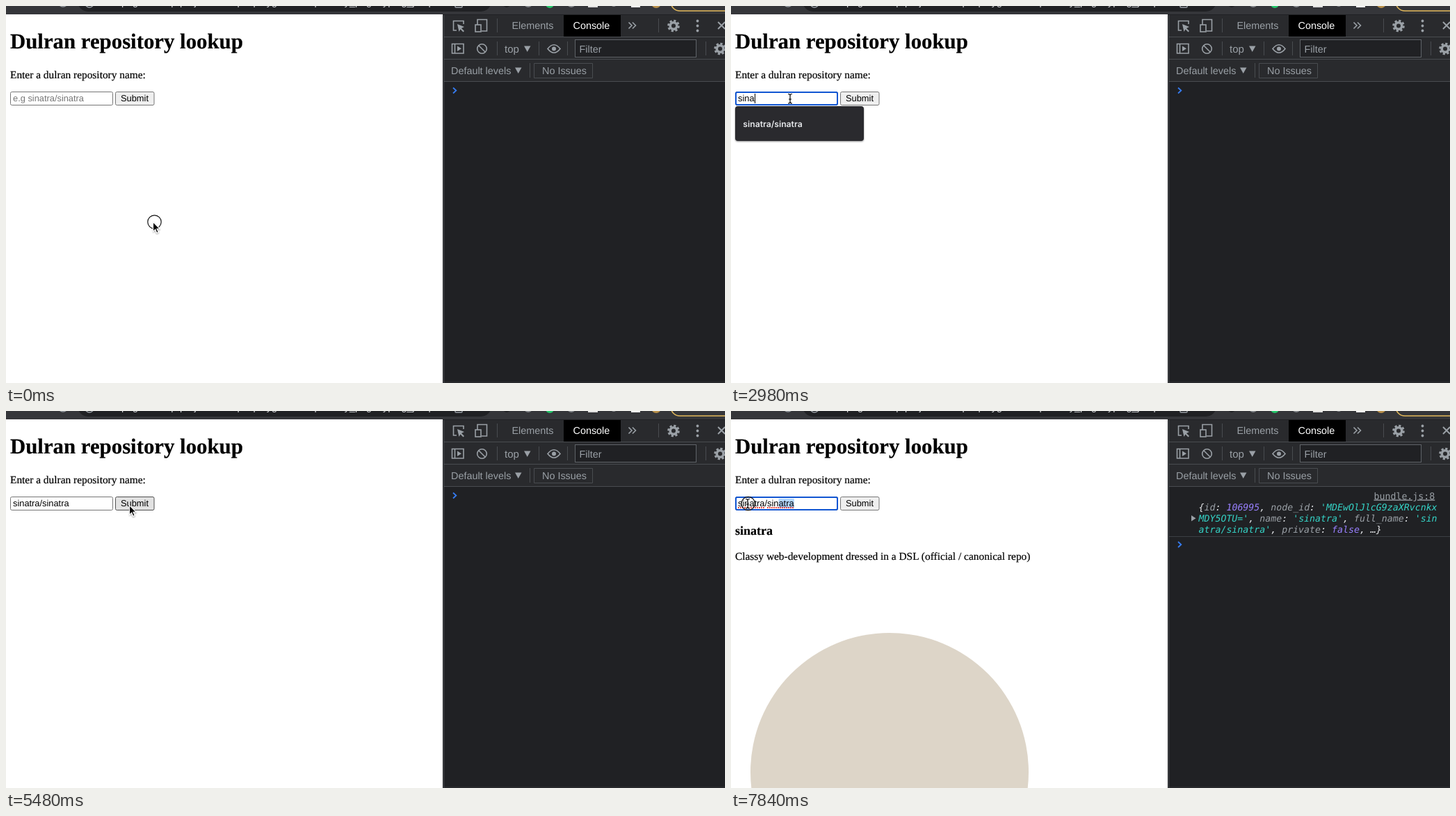
An HTML page for the animation above (7990 ms loop, 1034 by 542 pixels).

```html
<!DOCTYPE html>
<html lang="en">
<head>
<meta charset="utf-8">
<title>Repository lookup</title>
<style>
  html, body { margin: 0; width: 100%; height: 100%; overflow: hidden; background: #fff; }
  svg { display: block; width: 1034px; height: 542px; }
  text { white-space: pre; text-rendering: geometricPrecision; }
  .serif { font: 15.4px "Liberation Serif", Times, serif; stroke: #000; stroke-width: .2px; }
  .h1 { font-size: 30.8px; font-weight: bold; }
  .h3 { font-size: 18px; font-weight: bold; }
  .field { font: 12.83px "Liberation Sans", Arial, sans-serif; }
  .hint { font: 600 12.2px Inter, sans-serif; fill: #e8eaed; }
  .tools { font: 14.4px "Liberation Sans", Arial, sans-serif; fill: #9aa0a6; }
  .log { font: 13.25px "DejaVu Sans Mono", monospace; fill: #9aa0a6; }
  .log .obj { font-style: italic; }
  .log .w { fill: #e8eaed; }
  .log .s { fill: #35d4c7; }
  .log .n { fill: #9980ff; }
  .line { fill: none; stroke: #9aa0a6; stroke-width: 1.6; }
  .rule { fill: none; stroke: #494c50; }
</style>
</head>
<body>
<svg viewBox="0 0 1034 542">
  <defs>
    <filter id="shadow" x="-10%" y="-10%" width="120%" height="130%">
      <feDropShadow dx="0" dy="1" stdDeviation="1.3" flood-opacity=".45"/>
    </filter>
    <g id="gear" fill="none" stroke="#9aa0a6">
      <circle r="4.8" stroke-width="3.6"/>
      <circle r="7.4" stroke-width="2.8" stroke-dasharray="3.2 2.61"/>
    </g>
  </defs>
  <rect width="1034" height="542" fill="#fff"/>

  <!-- Page -->
  <g class="serif">
    <text class="h1" x="6" y="61">Dulran repository lookup</text>
    <text x="6" y="104">Enter a dulran repository name:</text>
  </g>
  <g id="result">
    <g class="serif">
      <text class="h3" x="6" y="178">sinatra</text>
      <text x="6" y="214">Classy web-development dressed in a DSL (official / canonical repo)</text>
    </g>
    <circle cx="228" cy="519" r="200" fill="#ddd5c8"/>
  </g>
  <rect x="6.5" y="123.5" width="147" height="19" rx="2" fill="#fff" stroke="#767676"/>
  <rect id="focus" x="7" y="124" width="146" height="18" rx="2" fill="#fff" stroke="#1055d2" stroke-width="2"/>
  <rect id="selection" x="68.5" y="126" width="22.3" height="14" fill="#b3d7ff"/>
  <text id="value" class="field" x="10" y="137"></text>
  <path id="squiggle" d="M10 139H48M52 139H90" stroke="#e5392f" stroke-width="1.8" stroke-dasharray="1.8 1.2"/>
  <path id="caret" d="M.5 126V140" stroke="#000"/>
  <rect id="button" x="157.5" y="123.5" width="55.5" height="19" rx="2"/>
  <text class="field" x="185" y="137" text-anchor="middle">Submit</text>
  <g id="menu">
    <rect x="6" y="144" width="185" height="50" rx="4" fill="#292a2d" filter="url(#shadow)"/>
    <text class="hint" x="17.3" y="174">sinatra/sinatra</text>
  </g>

  <!-- Browser bar -->
  <rect width="1034" height="12" fill="#35363a"/>
  <rect x="103" y="-22" width="595" height="30" rx="15" fill="#202124"/>
  <text class="tools" x="166" y="-1.5" style="fill:#d5d7da">page-lookup-project.example/playground/repository_page/typing_jump</text>
  <g fill="none" stroke="#9aa0a6" stroke-width="1.5">
    <circle cx="82" cy="-6" r="7"/><circle cx="120" cy="-4" r="6"/>
    <rect x="646" y="-8" width="10" height="10" rx="1"/>
    <rect x="956" y="-20" width="100" height="27" rx="13" stroke="#e3b95b"/>
  </g>
  <g fill="#85888c">
    <circle cx="720" cy="-3" r="5" fill="#202124"/><circle cx="751" cy="-4" r="6"/>
    <circle cx="782" cy="-3" r="6" fill="#24c76a"/><circle cx="813" cy="-4" r="6"/>
    <rect x="837" y="-8" width="14" height="10" fill="#ddd"/><circle cx="874" cy="-4" r="5"/>
    <rect x="899" y="-9" width="13" height="11" fill="#eee"/><circle cx="935" cy="-4" r="7" fill="#b9904a"/>
  </g>

  <!-- Developer tools -->
  <rect x="628" y="12" width="406" height="530" fill="#202124"/>
  <rect x="630" y="13" width="404" height="96" fill="#292a2d"/>
  <rect x="802" y="13" width="82" height="31" fill="#000"/>
  <rect x="818.5" y="48.5" width="174" height="25" fill="#202124" stroke="#5f6368"/>
  <path class="rule" d="M629.5 13V542M630 44.5H1034M630 76.5H1034M630 108.5H1034M706.5 18V38M938.5 18V38M706.5 51V71M766.5 51V71M807.5 51V71M1006.5 51V71M753.5 82V103M759.5 82.5H843.5V103.5H759.5Z"/>
  <path d="M630 541H1034" stroke="#292a2d" stroke-width="2"/>
  <g class="line">
    <path d="M648 35H643.5V21.5H658V26"/>
    <path d="M678 27V19.5H691.5V36H684"/><rect x="675" y="27" width="8" height="10"/>
    <path d="M895.5 23.5L900 28L895.5 32.5M901 23.5L905.5 28L901 32.5"/>
    <path d="M1024 23L1034 33M1034 23L1024 33" stroke-width="2"/>
    <path d="M641.5 54.5H658V68H641.5ZM645.5 54V68"/>
    <circle cx="684.5" cy="61.5" r="6.8"/><path d="M679.7 56.7L689.3 66.3"/>
    <path d="M779 61.5Q788 50 797 61.5Q788 73 779 61.5Z"/>
  </g>
  <g fill="#9aa0a6">
    <path d="M649 26L659 30L655 32L659 36L657.5 37.5L653.5 33.5L651.5 37Z"/>
    <path d="M649 57.5V65L655 61.2Z"/><circle cx="788" cy="61.5" r="3"/>
    <circle cx="994.5" cy="21.5" r="1.9"/><circle cx="994.5" cy="28.5" r="1.9"/><circle cx="994.5" cy="35.5" r="1.9"/>
    <path d="M745 57.5H754.5L749.7 66ZM732 88.5H741.5L736.7 97Z"/>
  </g>
  <use href="#gear" x="960" y="28.5"/><use href="#gear" x="1027" y="61.5"/>
  <g class="tools">
    <text x="727.5" y="33">Elements</text>
    <text x="815.5" y="33" style="fill:#fff">Console</text>
    <text x="717" y="66.5" style="font-size:15px">top</text>
    <text x="824.5" y="67">Filter</text>
    <text x="640" y="97.5">Default levels</text>
    <text x="771" y="97.5">No Issues</text>
  </g>
  <g id="output" class="log">
    <text x="924.5" y="126.5" text-decoration="underline">bundle.js:8</text>
    <g class="obj">
      <text x="672.5" y="143"><tspan class="w">{</tspan>id<tspan class="w">: </tspan><tspan class="n">106995</tspan><tspan class="w">, </tspan>node_id<tspan class="w">: </tspan><tspan class="s">'MDEwOlJlcG9zaXRvcnkx</tspan></text>
      <text x="672.5" y="159"><tspan class="s">MDY5OTU='</tspan><tspan class="w">, </tspan>name<tspan class="w">: </tspan><tspan class="s">'sinatra'</tspan><tspan class="w">, </tspan>full_name<tspan class="w">: </tspan><tspan class="s">'sin</tspan></text>
      <text x="672.5" y="175"><tspan class="s">atra/sinatra'</tspan><tspan class="w">, </tspan>private<tspan class="w">: </tspan><tspan class="n">false</tspan><tspan class="w">, …}</tspan></text>
    </g>
    <path d="M662 150V158.5L668.5 154.2Z"/>
    <path d="M630 180.5H1034" stroke="#3c3f43"/>
  </g>
  <path id="prompt" d="M643 117.5L647.3 121.5L643 125.5" fill="none" stroke="#367cf1" stroke-width="1.8"/>

  <!-- Pointer -->
  <g id="pointer">
    <circle id="ring" r="9.7" fill="none" stroke="#111" stroke-width="1.2"/>
    <path id="arrow" d="M0 0V13.6L3.2 10.7L5.3 15.8L7.7 14.8L5.5 9.8H9.7Z" fill="#000" stroke="#fff" stroke-width="1.1" filter="url(#shadow)"/>
    <g id="beam" fill="none">
      <path d="M-3 -6.5Q0 -6.5 0 -4.5Q0 -6.5 3 -6.5M0 -5V5.5M-3 7Q0 7 0 5Q0 7 3 7M-2 1H2" stroke="#fff" stroke-width="2.6" opacity=".8"/>
      <path d="M-3 -6.5Q0 -6.5 0 -4.5Q0 -6.5 3 -6.5M0 -5V5.5M-3 7Q0 7 0 5Q0 7 3 7M-2 1H2" stroke="#000" stroke-width="1.2"/>
    </g>
  </g>
</svg>
<script>
const LOOP = 7990, TICK = 148;
const NAME = "sinatra/sinatra";

// [tick, x, y] stops of the pointer
const path = [
  [0, 211.5, 310.5], [3, 211.5, 310.5], [10, 85, 133], [30, 85, 133],
  [34, 178, 126], [36, 178, 126], [37, 177.5, 135.5], [41, 177.5, 135.5],
  [44, 154.5, 400.5], [49, 100, 133], [52, 100, 133], [53, 24, 133], [54, 24, 133]
];
// [tick, letters typed so far]
const typing = [
  [0, 0], [16, 1], [17, 2], [19, 3], [20, 4], [21, 6], [22, 7],
  [24, 8], [25, 10], [27, 11], [28, 12], [29, 14], [30, 15]
];
const clicks = [0, 12, 35, 50, 51, 52, 53];

const el = {};
document.querySelectorAll("svg [id]").forEach(e => el[e.id] = e);
const show = (e, on) => e.style.display = on ? "" : "none";
const set = (e, attrs) => { for (const k in attrs) e.setAttribute(k, attrs[k]); };

function pointerAt(n) {
  const i = Math.max(1, path.findIndex(p => p[0] >= n));
  const [t0, x0, y0] = path[i - 1], [t1, x1, y1] = path[i];
  const u = (n - t0) / (t1 - t0), k = u * u * (3 - 2 * u);
  return [x0 + (x1 - x0) * k, y0 + (y1 - y0) * k];
}

function draw(n) {
  const [x, y] = pointerAt(n);
  const inRow = y > 123 && y < 143;
  const overInput = inRow && x > 6 && x < 154;
  const overButton = inRow && x > 157 && x < 213;
  const focused = n >= 12 && n < 35 || n >= 50;
  const selecting = n >= 53, loaded = n >= 38;

  const typed = NAME.slice(0, typing.filter(s => s[0] <= n).pop()[1]);
  el.value.textContent = typed || "e.g " + NAME;
  set(el.value, { fill: typed ? "#000" : "#757575" });
  const caretX = typed ? Math.round(10 + el.value.getComputedTextLength()) : 10;
  set(el.caret, { transform: `translate(${caretX})` });
  show(el.caret, focused && !selecting);

  show(el.focus, focused);
  set(el.button, overButton
    ? { fill: "#e2e2e2", stroke: "#4f4f4f" }
    : { fill: "#efefef", stroke: "#767676" });
  show(el.menu, n >= 12 && n < 30);
  show(el.selection, selecting);
  show(el.squiggle, n >= 51);

  show(el.result, loaded);
  show(el.output, loaded);
  set(el.prompt, { transform: `translate(0 ${loaded ? 70.5 : 0})` });

  set(el.pointer, { transform: `translate(${x} ${y})` });
  set(el.ring, { cx: overInput ? 0.7 : 2 });
  show(el.ring, clicks.includes(n));
  show(el.beam, overInput);
  show(el.arrow, !overInput);
}

function frame() {
  const t = performance.now() % LOOP;
  draw(Math.min(53, Math.floor((t + 8) / TICK)));
  requestAnimationFrame(frame);
}
frame();
</script>
</body>
</html>
```
